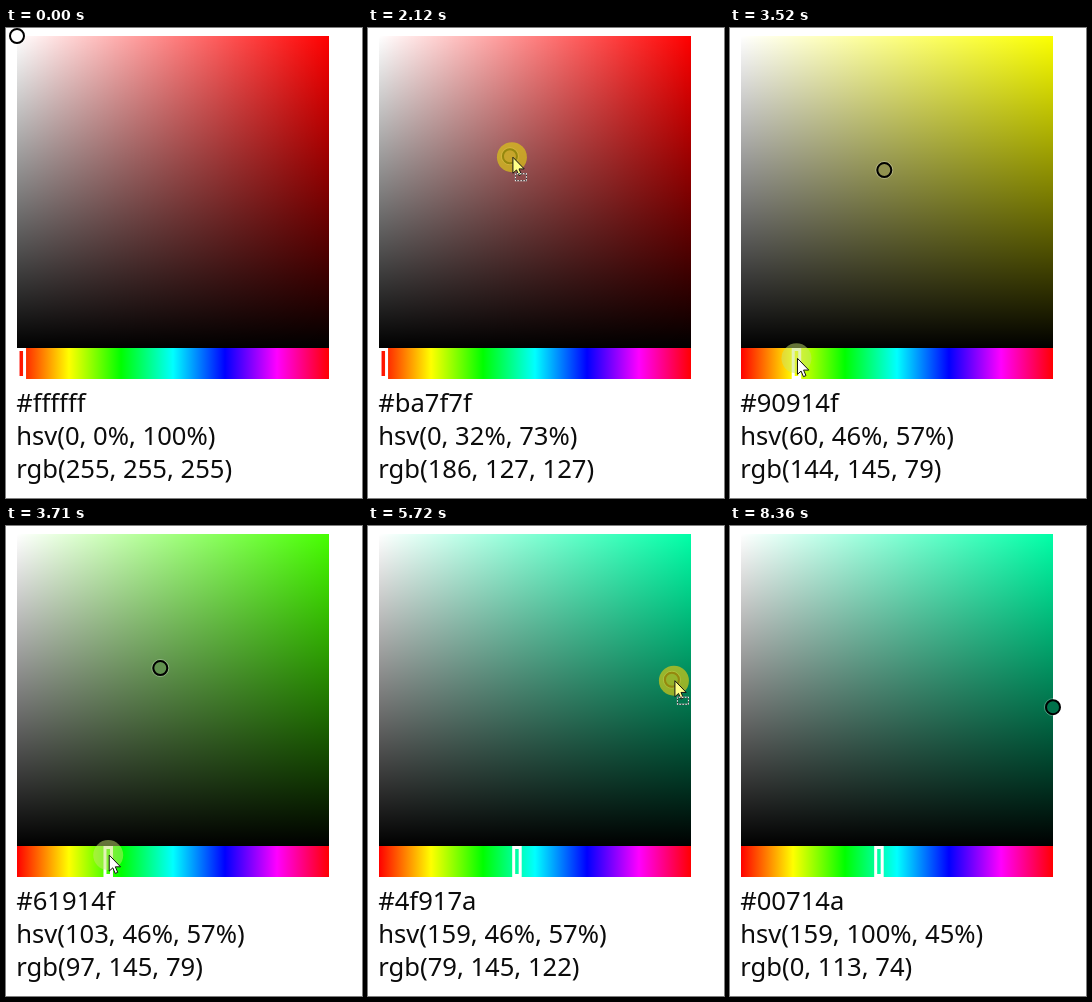
An HTML page for the animation above (8670 ms loop, 356 by 470 pixels).

```html
<!DOCTYPE html>
<html lang="en">
<head>
<meta charset="utf-8">
<title>Colour picker</title>
<style>
  html, body { margin: 0; width: 100%; height: 100%; overflow: hidden; background: #fff; }
  svg { display: block; width: 356px; height: 470px; }
  text { font: 25.6px "Noto Sans", "Open Sans", sans-serif; fill: #0c0c0c; white-space: pre; }
  #halo { fill: rgba(220, 200, 20, .68); }
  #arrow { fill: #fff; stroke: #111; }
  .ring #arrow { fill: #ffff88; }
  .hue #halo { fill: rgba(200, 230, 110, .5); }
  #pointer:not(.ring) #parcel, #pointer:not(.ring):not(.hue) #halo { display: none; }
</style>
</head>
<body>
<svg viewBox="0 0 356 470">
  <defs>
    <linearGradient id="toWhite">
      <stop stop-color="#fff"/>
      <stop offset="1" stop-color="#fff" stop-opacity="0"/>
    </linearGradient>
    <linearGradient id="toBlack" x2="0" y2="1">
      <stop stop-color="#000" stop-opacity="0"/>
      <stop offset="1"/>
    </linearGradient>
    <linearGradient id="rainbow">
      <stop stop-color="#f00"/>
      <stop offset=".1667" stop-color="#ff0"/>
      <stop offset=".3333" stop-color="#0f0"/>
      <stop offset=".5" stop-color="#0ff"/>
      <stop offset=".6667" stop-color="#00f"/>
      <stop offset=".8333" stop-color="#f0f"/>
      <stop offset="1" stop-color="#f00"/>
    </linearGradient>
  </defs>

  <rect id="base" x="11" y="8" width="312" height="312"/>
  <rect x="11" y="8" width="312" height="312" fill="url(#toWhite)"/>
  <rect x="11" y="8" width="312" height="312" fill="url(#toBlack)"/>
  <rect x="11" y="320" width="312" height="31" fill="url(#rainbow)"/>
  <rect id="thumb" x="-3.25" y="321.5" width="6.5" height="28" fill="none" stroke="#fff" stroke-width="3"/>

  <text id="hex" x="10.2" y="384"></text>
  <text id="hsv" x="10.2" y="417"></text>
  <text id="rgb" x="10.2" y="450"></text>

  <g id="ring">
    <circle r="8.5" fill="none" stroke="#fff" stroke-opacity=".3"/>
    <circle id="dot" r="7" stroke="#000" stroke-width="2"/>
  </g>
  <g id="pointer">
    <circle id="halo" r="15"/>
    <path id="arrow" d="M1 0V16L4.6 12.7 7 18.3 9.5 17.2 7.1 11.7H12.3Z"/>
    <g id="parcel" fill="none">
      <rect x="3.5" y="16.5" width="11" height="7" stroke="#fff"/>
      <rect x="3.5" y="16.5" width="11" height="7" stroke="#222" stroke-dasharray="1.5 1.5"/>
    </g>
  </g>
</svg>

<script>
const LOOP = 8670;
const AREA = { x: 11, y: 8, size: 312 };
const SLIDER = { x: 15.3, travel: 302 };
const ENTRY = { x: 250, y: 475 };

// Each move eases the pointer to a point; a grabbed control stays held for `hold` ms more
const move = (from, to, x, y, grab, hold = 0) => ({ from, to, x, y, grab, release: to + hold });
const moves = [
  move(50, 890, 13, 9),
  move(950, 1400, 111.9, 93.5, 'ring', 30),
  move(1870, 2255, 156.3, 143.05, 'ring', 55),
  move(2310, 2850, 20, 332),
  move(3340, 4125, 133.9, 328, 'hue', 85),
  move(4210, 4390, 148.94, 327, 'hue'),
  move(4760, 5100, 156.3, 143.05),
  move(5200, 5900, 335, 157, 'ring', 320),
  move(6400, 6640, 321, 156),
  move(6700, 7070, 341, 217, 'ring', 250),
  move(7320, 7680, 341, 182.15, 'ring', 60),
  move(7740, 8360, 319, 472)
];

const $ = id => document.getElementById(id);
const clamp = (v, lo, hi) => Math.min(hi, Math.max(lo, v));
const place = (id, x, y) => $(id).setAttribute('transform', `translate(${x} ${y})`);
const paint = (id, colour) => $(id).setAttribute('fill', colour);
const easeOut = u => 1 - (1 - u) ** 2;
const easeInOut = u => u * u * (3 - 2 * u);

function pointerAt(t) {
  const i = moves.findLastIndex(m => m.from <= t);
  if (i < 0) return ENTRY;
  const m = moves[i], start = moves[i - 1] || ENTRY;
  const ease = m.grab === 'ring' ? easeInOut : easeOut;
  const k = ease(clamp((t - m.from) / (m.to - m.from), 0, 1));
  return { x: start.x + (m.x - start.x) * k, y: start.y + (m.y - start.y) * k };
}

// Where the pointer last held a control
function heldAt(grab, t) {
  const last = moves.findLast(m => m.grab === grab && m.from <= t);
  return last && pointerAt(Math.min(t, last.to));
}

function ringAt(t) {
  const p = heldAt('ring', t);
  if (!p) return { x: AREA.x, y: AREA.y };
  return {
    x: clamp(p.x - 2, AREA.x, AREA.x + AREA.size),
    y: clamp(p.y - 1, AREA.y, AREA.y + AREA.size)
  };
}

function hueAt(t) {
  const p = heldAt('hue', t);
  return p ? 360 * clamp((p.x - SLIDER.x) / SLIDER.travel, 0, 1) : 0;
}

const holding = (m, t) => m.grab && t >= m.from && t < m.release;

// The labels ignore the ring until it is dropped
function lastDrop(t) {
  for (const m of [...moves].reverse()) {
    if (m.grab === 'ring' && holding(m, t)) t = m.from - 1;
  }
  return t;
}

const satVal = p => [(p.x - AREA.x) / AREA.size, 1 - (p.y - AREA.y) / AREA.size];

function toRgb(h, s, v) {
  return [5, 3, 1].map(n => {
    const k = (n + h / 60) % 6;
    return Math.round(255 * v * (1 - s * clamp(Math.min(k, 4 - k), 0, 1)));
  });
}

const css = channels => `rgb(${channels.join(', ')})`;

function writeLabels(h, s, v) {
  const channels = toRgb(h, s, v);
  $('hex').textContent = '#' + channels.map(c => c.toString(16).padStart(2, '0')).join('');
  $('hsv').textContent = `hsv(${Math.floor(h)}, ${Math.round(s * 100)}%, ${Math.round(v * 100)}%)`;
  $('rgb').textContent = css(channels);
}

function render(t) {
  const hue = hueAt(t), ring = ringAt(t), pointer = pointerAt(t);
  const held = moves.find(m => holding(m, t));

  paint('base', css(toRgb(hue, 1, 1)));
  place('thumb', SLIDER.x + SLIDER.travel * hue / 360, 0);
  place('ring', ring.x, ring.y);
  paint('dot', css(toRgb(hue, ...satVal(ring))));
  writeLabels(hue, ...satVal(ringAt(lastDrop(t))));

  place('pointer', pointer.x, pointer.y);
  $('pointer').setAttribute('class', held ? held.grab : '');
}

const begin = performance.now();
function tick() {
  render((performance.now() - begin) % LOOP);
  requestAnimationFrame(tick);
}
tick();
</script>
</body>
</html>
```
